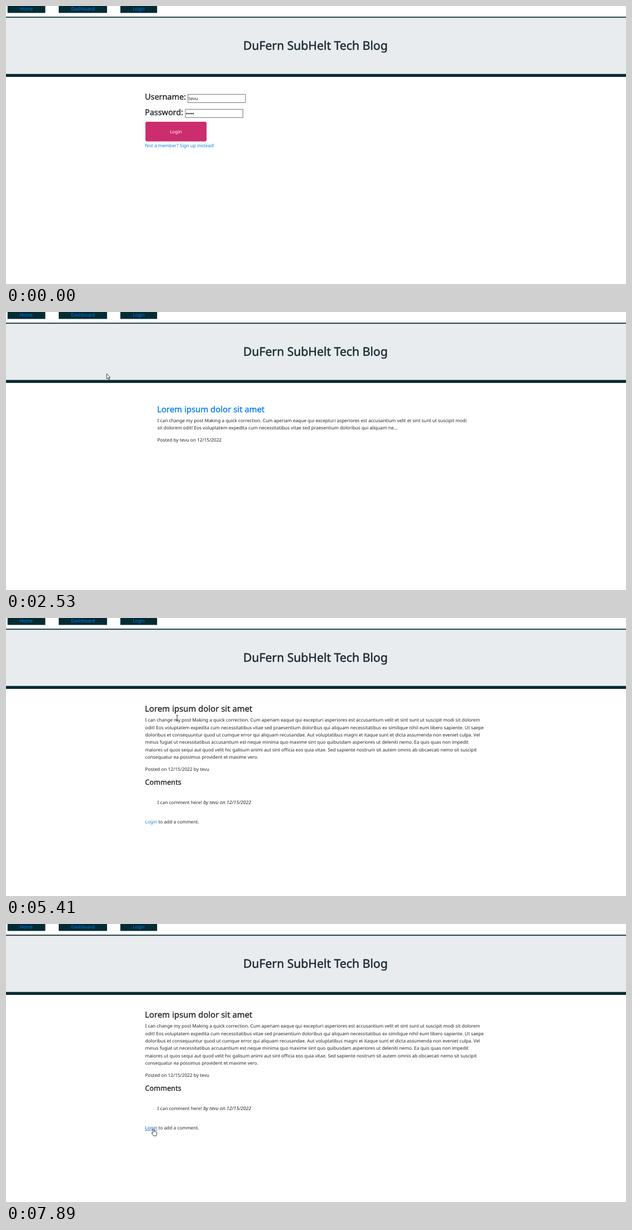
Write an HTML page that moves like this. It is 1116 px wide and 502 px high and loops after 8000 ms.

```html
<!DOCTYPE html>
<html lang="en">
<head>
<meta charset="utf-8">
<title>Tech Blog</title>
<style>
  html, body { margin: 0; width: 100%; height: 100%; overflow: hidden; background: #fff; }
  svg { display: block; width: 1116px; height: 502px; }
  text {
    font: 8.27px "Noto Sans", "Open Sans", sans-serif;
    fill: #212529;
    white-space: pre;
    text-rendering: geometricPrecision;
  }
  .h1, .h3, .h4, .label { stroke: #212529; stroke-width: .35px; }
  .h1 { font-size: 21.27px; fill: #1a2b32; stroke: #1a2b32; stroke-width: .5px; }
  .h3 { font-size: 14.92px; }
  .h4 { font-size: 12.75px; }
  .label { font-size: 14.4px; }
  .mid { text-anchor: middle; }
  .link { fill: #007bff; }
  .h3.link { stroke: #007bff; }
  .soft { fill: #1480e6; }
  .hover { fill: #0056b3; text-decoration: underline; }
  .h3.hover { stroke: #0056b3; text-decoration: none; }
  .dark { fill: #032b32; }
  .field { fill: #fff; stroke: #767676; }
  .white { fill: #fff; }
  .italic { font-style: italic; font-size: 8.7px; }
  #cursor path { fill: #fff; stroke: #111; stroke-width: .8; stroke-linejoin: round; }
  #cursor #beam { fill: none; }
</style>
</head>
<body>
<svg viewBox="0 0 1116 502">
  <g class="dark">
    <rect x="2.8" y="0" width="67.9" height="12.5"/>
    <rect x="94.9" y="0" width="87" height="12.5"/>
    <rect x="205.8" y="0" width="66.2" height="12.5"/>
  </g>
  <text id="home" class="link mid" x="36.5" y="7.8">Home</text>
  <text class="link mid" x="138.3" y="7.8">Dashboard</text>
  <text class="link mid" x="239" y="7.8">Login</text>

  <rect class="dark" y="19.4" width="1116" height="108.6"/>
  <rect fill="#e8ecee" y="21.2" width="1116" height="101.5"/>
  <text class="h1 mid" x="557" y="79">DuFern SubHelt Tech Blog</text>

  <g id="login">
    <text class="label" x="250" y="169.4">Username:</text>
    <rect class="field" x="327.5" y="159.5" width="103.5" height="15"/>
    <text x="328.8" y="169.8">tevu</text>
    <text class="label" x="250" y="197.1">Password:</text>
    <rect class="field" x="322.9" y="186.5" width="103.5" height="15"/>
    <g fill="#212529">
      <circle cx="325.7" cy="194.2" r="1.3"/>
      <circle cx="329.4" cy="194.2" r="1.3"/>
      <circle cx="333.1" cy="194.2" r="1.3"/>
      <circle cx="336.8" cy="194.2" r="1.3"/>
    </g>
    <rect x="251" y="209" width="110" height="35.5" rx="3" fill="#cc2d6c"/>
    <text class="white mid" x="305.8" y="230.2">Login</text>
    <text class="soft" x="250.5" y="254.6">Not a member? Sign up instead!</text>
  </g>

  <g id="list">
    <text id="post" class="h3 link" x="272" y="180.6">Lorem ipsum dolor sit amet</text>
    <rect id="rule" x="273" y="182" width="193.3" height="1.1" fill="#0056b3"/>
    <text x="272.6" y="198.8">I can change my post Making a quick correction. Cum aperiam eaque qui excepturi asperiores est accusantium velit et sint sunt ut suscipit modi</text>
    <text x="272.6" y="212.2">sit dolorem odit! Eos voluptatem expedita cum necessitatibus vitae sed praesentium doloribus qui aliquam ne...</text>
    <text x="272.6" y="233.9">Posted by tevu on 12/15/2022</text>
  </g>

  <g id="article">
    <text class="h3" x="250" y="169.4">Lorem ipsum dolor sit amet</text>
    <text x="250.5" y="187.4">I can change my post Making a quick correction. Cum aperiam eaque qui excepturi asperiores est accusantium velit et sint sunt ut suscipit modi sit dolorem</text>
    <text x="250.5" y="200.8">odit! Eos voluptatem expedita cum necessitatibus vitae sed praesentium doloribus qui aliquam necessitatibus ex similique nihil eum libero sapiente. Ut saepe</text>
    <text x="250.5" y="214.1">doloribus et consequuntur quod ut cumque error qui aliquam recusandae. Aut voluptatibus magni et itaque sunt et dicta assumenda non eveniet culpa. Vel</text>
    <text x="250.5" y="227.4">minus fugiat ut necessitatibus accusantium est neque minima quo maxime sint quo quibusdam asperiores ut deleniti nemo. Ea quis quas non impedit</text>
    <text x="250.5" y="240.8">maiores ut quos sequi aut quod velit hic galisum animi aut sint officia eos quia vitae. Sed sapiente nostrum sit autem omnis ab obcaecati nemo sit suscipit</text>
    <text x="250.5" y="254.1">consequatur ea possimus provident et maxime vero.</text>
    <text x="250.5" y="275.9">Posted on 12/15/2022 by tevu</text>
    <text class="h4" x="250.3" y="300.9">Comments</text>
    <text x="272.6" y="335.9">I can comment here!</text>
    <text class="italic" x="355.2" y="335.9">by tevu on 12/15/2022</text>
    <text x="250.5" y="371.4"><tspan id="join" class="soft">Login</tspan> to add a comment.</text>
  </g>

  <g id="cursor">
    <path id="arrow" d="M.3 .5V9.8L2.4 7.8 3.9 11.3 5.4 10.6 3.9 7.2H6.7Z"/>
    <path id="hand" d="M-1.1 1.2Q0-.6 1.1 1.2V4.6C1.6 4 2.8 4.2 3 5 3.6 4.6 4.6 4.9 4.7 5.6 5.4 5.4 6 5.8 6 6.6V9C6 10.5 5.2 11 5 12.6H0C-.3 11.2-2.3 9.4-3.4 7.6-3.9 6.6-2.6 6-1.1 7.6Z"/>
    <path id="beam" d="M-2-5H-.6L0-4.5 .6-5H2M0-4.5V4.5M-2 5H-.6L0 4.5 .6 5H2"/>
  </g>
</svg>
<script>
  const LOOP = 8000, TICK = 66.85;
  const $ = id => document.getElementById(id);
  const ease = {
    lin: u => u,
    out: u => 1 - (1 - u) ** 2,
    soft: u => u * u * (3 - 2 * u)
  };

  // Pointer stops: tick, x, y, easing used to get there
  const stops = [
    [5, 1064, 489, 'lin'],
    [17, 39.5, 10, 'out'],
    [18, 39.5, 8, 'lin'],
    [33, 39, 8, 'lin'],
    [38, 181, 111, 'lin'],
    [46, 305, 185.5, 'out'],
    [49, 306, 184.5, 'lin'],
    [57, 307.5, 178, 'soft'],
    [80, 307.5, 178, 'lin'],
    [93, 337, 342, 'soft'],
    [96, 340.3, 346.8, 'lin'],
    [100, 366, 354.5, 'soft'],
    [105, 337, 362, 'soft'],
    [112, 285, 377, 'soft'],
    [118, 265.5, 370, 'out']
  ];

  const within = (v, a, b) => v >= a && v < b;
  const show = (id, on) => { $(id).style.display = on ? '' : 'none'; };
  const hover = (id, on) => $(id).classList.toggle('hover', on);

  function pointer(k) {
    const i = stops.findIndex(s => s[0] >= k);
    if (i < 0) return stops[stops.length - 1].slice(1, 3);
    if (i === 0) return stops[0].slice(1, 3);
    const [k0, x0, y0] = stops[i - 1], [k1, x1, y1, type] = stops[i];
    const u = ease[type]((k - k0) / (k1 - k0));
    return [x0 + (x1 - x0) * u, y0 + (y1 - y0) * u];
  }

  function shapeAt(k, y) {
    if (within(k, 16, 29) || within(k, 42, 81) || k >= 115) return 'hand';
    const overText = within(y, 178, 258) || within(y, 267, 280) || within(y, 327, 340);
    if (within(k, 81, 94) && overText || within(k, 104, 109)) return 'beam';
    return 'arrow';
  }

  function draw(t) {
    const k = Math.floor(t / TICK + .2);
    const page = k < 22 ? 'login' : k < 70 ? 'list' : 'article';
    for (const id of ['login', 'list', 'article']) show(id, id === page);

    const overPost = within(k, 42, 47) || within(k, 51, 70);
    hover('home', within(k, 16, 22));
    hover('post', overPost);
    show('rule', overPost);
    hover('join', k >= 115);

    const [x, y] = pointer(k);
    const shape = shapeAt(k, y);
    for (const id of ['arrow', 'hand', 'beam']) show(id, id === shape);
    show('cursor', k >= 5);
    $('cursor').setAttribute('transform', `translate(${x.toFixed(2)} ${y.toFixed(2)})`);
  }

  const start = performance.now();
  function frame() {
    draw((performance.now() - start) % LOOP);
    requestAnimationFrame(frame);
  }
  frame();
</script>
</body>
</html>
```
